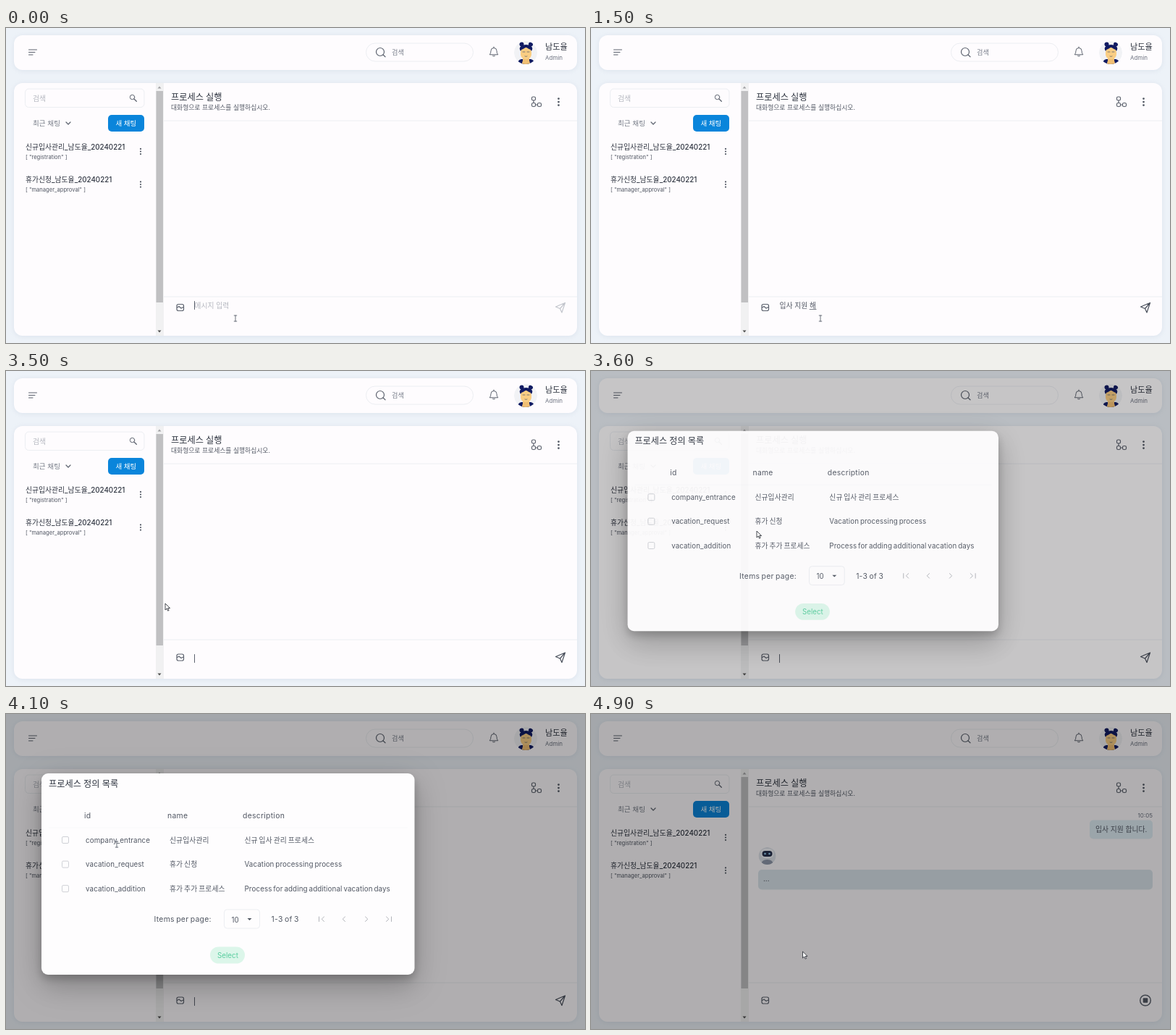
Write an HTML page that moves like this. It is 800 px wide and 435 px high and loops after 5 s.

```html
<!DOCTYPE html>
<html lang="ko">
<head>
<meta charset="utf-8">
<title>프로세스 실행</title>
<style>
  html, body { margin: 0; width: 100%; height: 100%; overflow: hidden; background: #edf2f8; }
  svg { display: block; width: 800px; height: 435px; font-family: Inter, "Noto Sans CJK KR", sans-serif; font-size: 9.8px; fill: #525864; }
  text { white-space: pre; }
  .card { fill: #fefcfe; filter: drop-shadow(0 1px 3px #b9c6d855); }
  .line { fill: none; stroke: #5c626e; stroke-linecap: round; stroke-linejoin: round; }
  .rule { fill: none; stroke: #eceef2; }
  .bold { font-weight: 500; fill: #2c323e; }
  .hint { fill: #b4b7bf; }
  .small { font-size: 7.6px; }
  .wide { font-size: 10.4px; letter-spacing: .28px; word-spacing: -.8px; }
  #rows { letter-spacing: .1px; word-spacing: -1px; }
  #dialog { transform-origin: 307px 221px; }
  #sheet { fill: #fefdfe; filter: drop-shadow(0 6px 6px #0003) drop-shadow(0 18px 18px #0002) drop-shadow(0 8px 22px #0002); }
</style>
</head>
<body>
<svg viewBox="0 0 800 435">
  <defs>
    <g id="dots"><circle cy="-3.6" r="1.1"/><circle r="1.1"/><circle cy="3.6" r="1.1"/></g>
    <clipPath id="face"><circle cx="718" cy="34" r="16"/></clipPath>
    <clipPath id="botClip"><circle cx="243.5" cy="196" r="12"/></clipPath>
  </defs>
  <rect width="800" height="435" fill="#edf2f8"/>

  <!-- top bar -->
  <rect class="card" x="11" y="10" width="778" height="48" rx="12"/>
  <path class="line" d="M31.5 30h11M31.5 33.5h8.500M31.5 37h5.500"/>
  <rect class="rule" x="497.500" y="21" width="148" height="25" rx="12.500"/>
  <g class="line" stroke-width="1.200"><circle cx="517" cy="33" r="5.500"/><path d="M521 37l3 2.800"/></g>
  <text x="533" y="37" font-size="9.200" fill="#777d89">검색</text>
  <path class="line" d="M668.500 36.500q1.500-1.500 1.500-5a4 4 0 0 1 8 0q0 3.500 1.500 5zM672.500 38.500q1.500 1 3 0M674 26v1.300"/>
  <g clip-path="url(#face)">
    <circle cx="718" cy="34" r="16" fill="#f1f2f5"/>
    <path d="M707 50q0-6 5-7h13q5 1 5 7z" fill="#111b63"/>
    <path d="M714 39h9v6l1.500 5h-12l1.500-5z" fill="#f0bf74"/>
    <g fill="#111b63"><circle cx="712.500" cy="22.500" r="3"/><circle cx="725" cy="22.500" r="3"/><ellipse cx="718.500" cy="28.500" rx="8.800" ry="5.500"/></g>
    <rect x="711" y="27" width="15" height="16" rx="6.500" fill="#f9cd83"/>
    <path d="M710.500 30.500q4-1 8-4q4 3 8 4v-3q-8-6-16 0z" fill="#111b63"/>
    <path d="M714 33h3M720 33h3M717 39q1.500 1 3 0" class="line" stroke-width=".8"/>
  </g>
  <text class="bold" x="745" y="29.800" font-size="11.200">남도율</text>
  <text x="745" y="44" font-size="8" fill="#6d7380">Admin</text>

  <!-- chat list -->
  <rect class="card" x="11" y="76" width="778" height="349" rx="12"/>
  <rect class="rule" x="26.500" y="84" width="164.500" height="25.500" rx="5"/>
  <text class="hint" x="37" y="100.500">검색</text>
  <g class="line"><circle cx="174.500" cy="95.500" r="3.200"/><path stroke-width="1.300" d="M177 98l3.300 3.300"/></g>
  <text x="37" y="134.800" font-size="9.600" fill="#777d88">최근 채팅</text>
  <path class="line" d="M83 130l3 3 3-3" stroke-width="1.200"/>
  <rect x="141" y="120" width="50" height="23" rx="5" fill="#0a85db"/>
  <text x="151.500" y="135" font-weight="500" font-size="9.500" fill="#fff">새 채팅</text>
  <text class="bold" x="27" y="167.500">신규입사관리_남도율_20240221</text>
  <text class="small" x="27" y="180.700">[ "registration" ]</text>
  <use href="#dots" x="186" y="170.500"/>
  <text class="bold" x="27" y="213">휴가신청_남도율_20240221</text>
  <text class="small" x="27" y="226.200">[ "manager_approval" ]</text>
  <use href="#dots" x="186" y="216"/>
  <rect x="207" y="76" width="11" height="349" fill="#f1f1f2"/>
  <rect x="207.500" y="87" width="9.500" height="292" fill="#c0c0c2"/>
  <path d="M209.500 83.500h5l-2.500-3z" fill="#a3a3a5"/>
  <path d="M209.500 417.500h5l-2.500 3z" fill="#505050"/>

  <!-- conversation -->
  <text class="bold" x="228" y="99.500" font-size="12.200">프로세스 실행</text>
  <text x="228" y="113" font-size="8.800">대화형으로 프로세스를 실행하십시오.</text>
  <g class="line" stroke-width="1.200">
    <rect x="726.500" y="95" width="5" height="5" rx="1.800"/><rect x="726.500" y="103.500" width="5" height="5" rx="1.800"/>
    <rect x="734.500" y="103.500" width="5" height="5" rx="1.800"/><path d="M729 100v3.500M731.500 106h3"/>
  </g>
  <use href="#dots" transform="translate(763.500 102) scale(1.250)"/>
  <path class="rule" d="M218 128h571M218 371h571"/>
  <g id="message">
    <text x="776" y="143" font-size="8" text-anchor="end" fill="#6d7380">10:05</text>
    <rect x="689" y="146.500" width="87" height="26" rx="5" fill="#e0eef6"/>
    <text x="697" y="162.500">입사 지원 합니다.</text>
    <g clip-path="url(#botClip)">
      <circle cx="243.500" cy="196" r="12" fill="#dfe3ea"/>
      <rect x="234.500" y="186" width="18" height="13" rx="6" fill="#f4f6fa"/>
      <rect x="236.500" y="189" width="14" height="8" rx="4" fill="#26304c"/>
      <circle cx="240.500" cy="193" r="1.300" fill="#9bd2f5"/><circle cx="246.500" cy="193" r="1.300" fill="#9bd2f5"/>
      <path d="M235 209q0-8 8.500-8t8.500 8z" fill="#8f98aa"/>
    </g>
    <rect x="231" y="215" width="545" height="27.500" rx="5" fill="#dbe5ec"/>
    <text x="238" y="231">...</text>
  </g>

  <!-- composer -->
  <g id="tools">
    <g class="line" stroke-width="1.200"><rect x="236" y="381.500" width="9.500" height="9" rx="2.200"/><path d="M236.500 386l2.500-1.500 3 2.500 3-1.500"/></g>
    <path id="send" class="line" stroke-width="1.200" d="M772.500 379.500l-13 5.500 6 2.500 2.500 5.500zl-7 8"/>
    <g id="stop"><circle class="line" cx="766" cy="386" r="7.300" stroke-width="1.500"/><rect x="762.700" y="382.700" width="6.600" height="6.600" rx="1"/></g>
  </g>
  <text id="typed" x="260.500" y="386.500"></text>
  <path id="underline" class="line" stroke-width=".8"/>
  <path id="caret" class="line"/>

  <rect id="scrim" width="800" height="435" fill="#000"/>

  <!-- process picker -->
  <g id="dialog">
    <rect id="sheet" x="49" y="82" width="515.500" height="278" rx="9"/>
    <text class="bold" x="59" y="100.500" font-size="12.200">프로세스 정의 목록</text>
    <g class="wide"><text x="108" y="143.500">id</text><text x="223" y="143.500">name</text><text x="327" y="143.500">description</text></g>
    <path class="rule" stroke-opacity=".3" d="M59 157h496"/>
    <g id="rows"></g>
    <g id="check"><rect x="77" y="169" width="10" height="10" rx="1.500" fill="#20242c"/><path d="M79.300 174l2 2 3.700-4" fill="none" stroke="#fff" stroke-width="1.300"/></g>
    <g class="wide"><text x="204.500" y="287">Items per page:</text><text x="366.500" y="287">1-3 of 3</text></g>
    <rect class="rule" x="301.500" y="270" width="49" height="26" rx="4"/>
    <text x="311.500" y="287.500">10</text>
    <path d="M333.500 282h6l-3 3z"/>
    <path class="line" style="stroke:#b2b4ba" d="M432.500 280v6.500M439.500 280l-3.300 3.200 3.300 3.300M468.500 280l-3.300 3.200 3.300 3.300M496.500 280l3.300 3.200-3.300 3.300M525.500 280l3.300 3.200-3.300 3.300M532.500 280v6.500"/>
    <rect id="select" x="282" y="321.500" width="48" height="23" rx="11.500"/>
    <text id="selectText" x="292" y="336.500">Select</text>
  </g>

  <path id="beam" class="line" stroke-width=".9" d="M-1.800-4h3.600M0-4v8M-1.800 4h3.600"/>
  <path id="arrow" d="M0 0v9l2.200-2 1.400 3.200 1.500-.7-1.400-3h2.900z" fill="#fff" stroke="#30343c" stroke-width=".9"/>
</svg>
<script>
const $ = id => document.getElementById(id);
const show = (id, on) => $(id).setAttribute('visibility', on ? 'visible' : 'hidden');

const processes = [
  ['company_entrance', '신규입사관리', '신규 입사 관리 프로세스'],
  ['vacation_request', '휴가 신청', 'Vacation processing process'],
  ['vacation_addition', '휴가 추가 프로세스', 'Process for adding additional vacation days'],
];
$('rows').innerHTML = processes.map((cells, i) => {
  const y = 174 + i * 33.6;
  return `<rect x="77.500" y="${y - 4.5}" width="9" height="9" rx="1.500" fill="none" stroke="#cfd1d6"/>` +
    cells.map((cell, c) => `<text x="${[110, 226, 329.5][c]}" y="${y + 3.5}">${cell}</text>`).join('');
}).join('');

// Time and composer text; the last syllable is underlined while composing.
const typing = [
  [0, ''], [300, 'ㅇ'], [400, '이'], [500, '입'], [600, '잆'], [700, '입사'], [800, '입사 '], [900, '입사 ㅈ'],
  [1000, '입사 지'], [1100, '입사 지우'], [1200, '입사 지원'], [1300, '입사 지원 '], [1400, '입사 지원 ㅎ'],
  [1500, '입사 지원 해'], [1700, '입사 지원 하'], [1800, '입사 지원 합'], [2000, '입사 지원 합니'],
  [2400, '입사 지원 합니ㄷ'], [2500, '입사 지원 합니다'], [2600, '입사 지원 합니다.'], [3100, ''],
];
const pointer = [[0, 317, 401], [3300, 317, 401], [3400, 285, 378], [3500, 220, 321], [3600, 229, 221],
  [4100, 153, 180], [4300, 82, 172], [4400, 82, 172], [4700, 292.5, 328], [5000, 292.5, 328]];
const dialogFade = [[0, 0], [3500, 0], [3600, .95], [3700, 1], [4800, 1], [4900, 0], [5000, 0]];
const scrimFade = [[0, 0], [3500, 0], [3600, .22], [3700, .3], [3800, .31], [5000, .31]];

function sample(keys, t) {
  const i = keys.findIndex(k => k[0] > t);
  const [a, b] = [keys[i - 1], keys[i]];
  const p = (t - a[0]) / (b[0] - a[0]);
  return a.slice(1).map((v, n) => v + (b[n + 1] - v) * p);
}

function drawComposer(t) {
  const value = typing.findLast(k => k[0] <= t)[1];
  const sent = t >= 3100, waiting = t >= 4800;
  const empty = !sent && !value;
  const composing = /[^ .]$/.test(value);
  const typed = $('typed');
  typed.textContent = empty ? '메시지 입력' : value;
  typed.setAttribute('class', empty ? 'hint' : '');
  const end = 260.5 + (value ? typed.getComputedTextLength() : 0);
  $('underline').setAttribute('d', composing ? `M${end - 9} 388.500H${end}` : '');
  $('caret').setAttribute('d', `M${end} ${sent ? 391.5 : 377.5}v11`);
  show('caret', !composing && !waiting && !(t >= 2900 && t < 3100));
  $('tools').setAttribute('transform', `translate(0 ${sent ? 9.5 : 0})`);
  $('send').style.stroke = empty ? '#c3c6cd' : '#4a505c';
  show('send', !waiting);
  show('stop', waiting);
}

function drawDialog(t) {
  const [alpha] = sample(dialogFade, t);
  $('dialog').style.opacity = alpha;
  $('dialog').style.transform = `scale(${t < 3700 ? .994 : 1})`;
  $('scrim').setAttribute('opacity', sample(scrimFade, t)[0]);
  show('check', t >= 4400);
  $('select').setAttribute('fill', t >= 4800 ? '#b0ebd0' : t >= 4700 ? '#c6f1df' : '#dcf6ea');
  $('selectText').setAttribute('fill', t >= 4800 ? '#85cfae' : '#58cd9f');
}

function drawPointer(t) {
  const at = `translate(${sample(pointer, t)})`;
  const overText = t < 3400 || (t >= 3800 && t < 4200);
  for (const id of ['beam', 'arrow']) {
    $(id).setAttribute('transform', at);
    show(id, (id === 'beam') === overText);
  }
}

function frame() {
  const t = Math.floor(performance.now() % 5000 / 100) * 100;
  drawComposer(t);
  drawDialog(t);
  drawPointer(t);
  show('message', t >= 4800);
  requestAnimationFrame(frame);
}
frame();
</script>
</body>
</html>
```
